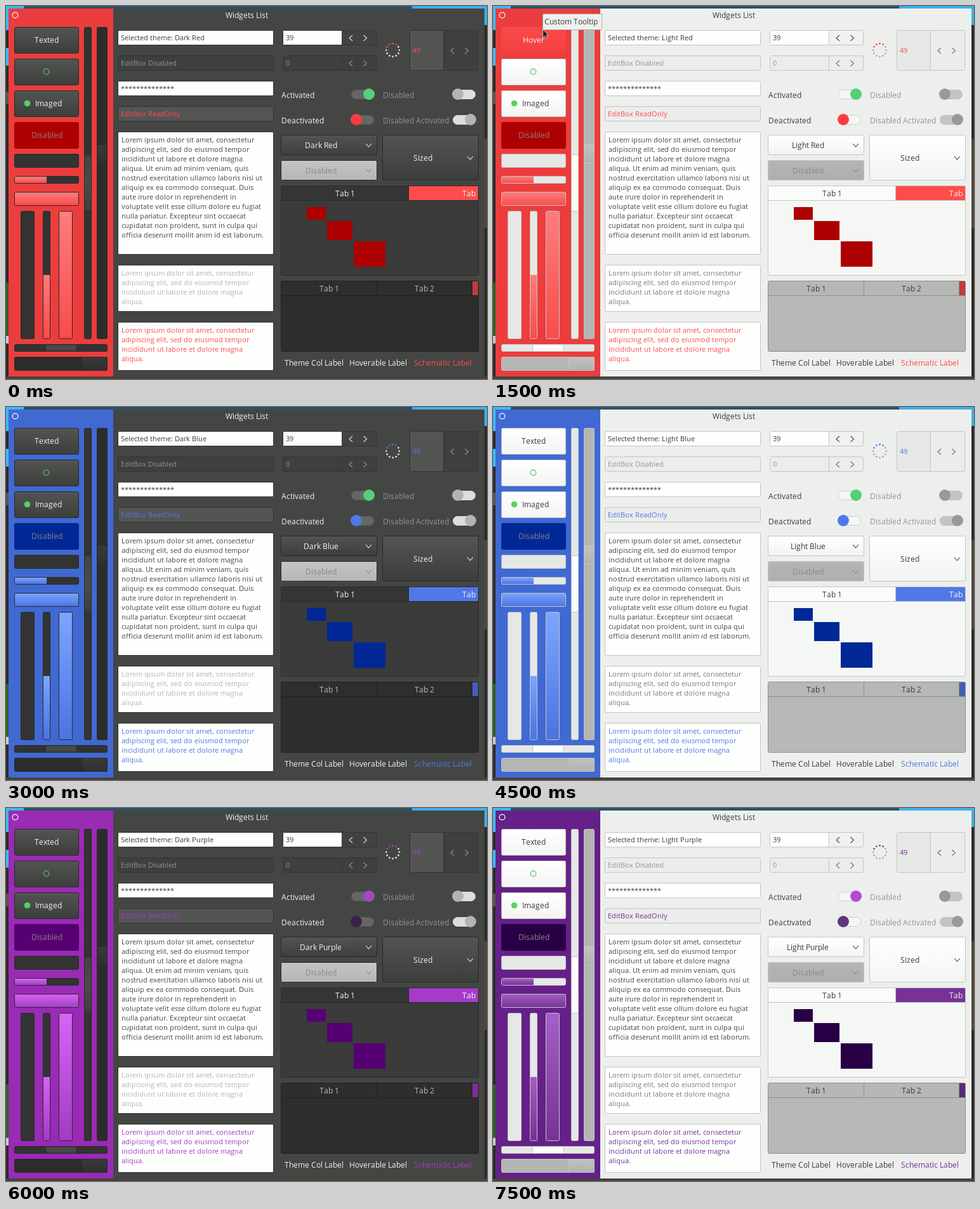
An HTML page with a canvas for the animation above (9000 ms loop, 758 px wide and 588 px high).

```html
<!DOCTYPE html>
<html lang="en">
<head>
<meta charset="utf-8">
<title>Widgets List</title>
<style>
html, body { margin: 0; width: 100%; height: 100%; overflow: hidden; }
canvas { display: block; width: 758px; height: 588px; }
</style>
</head>
<body>
<canvas id="stage" width="758" height="588"></canvas>
<script>
const ctx = document.getElementById('stage').getContext('2d');
const STEP = 1500;

const dark = {
  win: '#444644', text: '#f0f0f0', muted: '#929492', line: '#292a29',
  button: ['#535553', '#3c3e3c'], edit: '#fdfffd', editLine: '#333433', editOff: '#3e403e',
  readOnly: '#535553', hint: '#b4b4b4', arrows: '#414341', arrowsOff: '#3e403e',
  bigValue: '#535553', arrow: '#e0e0e0', arrowOff: '#929492',
  track: '#323332', thumb: ['#414341', '#4a4c4a', '#3c3e3c'], trackOff: '#2b2c2b', thumbOff: ['#393a39', '#2e2f2e'],
  switchOn: '#656765', switchOnLine: '#5c5e5c', switchOff: '#dcdedc', switchOffLine: '#dcdedc', knobOff: '#b2b4b2',
  comboOff: ['#c4c6c4', '#b4b6b4'], tabHead: '#343634', tabBody: '#3a3b3a',
  tabOff: '#2d2e2d', bodyOff: '#2c2d2c', tabOffLine: '#1f201f', tabOffText: '#b8bab8', dots: '#e8e8e8'
};
const light = {
  win: '#edefed', text: '#3c3e3c', muted: '#939593', line: '#c3c5c3',
  button: ['#ffffff', '#f2f4f2'], edit: '#fdfffd', editLine: '#c3c5c3', editOff: '#ebedeb',
  readOnly: '#ebedeb', hint: '#7a7c7a', arrows: '#f0f2f0', arrowsOff: '#ebedeb',
  bigValue: '#e6e8e6', arrow: '#464846', arrowOff: '#6e706e',
  track: '#e6e8e6', thumb: ['#fdfffd', '#f8faf8'], trackOff: '#b4b6b4', thumbOff: ['#c1c3c1', '#b0b2b0'],
  switchOn: '#f5f7f5', switchOnLine: '#cdcfcd', switchOff: '#c3c5c3', switchOffLine: '#b9bbb9', knobOff: '#989a98',
  comboOff: ['#b4b6b4', '#adafad'], tabHead: '#fafcfa', tabBody: '#f5f7f5',
  tabOff: '#b6b8b6', bodyOff: '#b7b9b7', tabOffLine: '#8c8e8c', tabOffText: '#3c3e3c', dots: '#a8aaa8'
};

const red = { side: '#eb3d3d', accent: '#ff4c4c', deep: '#ad0000', bar: ['#ff7d7d', '#fa4b4b'],
  dim: '#be3c3c', on: '#55cf78', off: '#ff3c3c' };
const blue = { side: '#4169d2', accent: '#5078e6', deep: '#002896', bar: ['#7da5ff', '#4b73e1'],
  dim: '#4160b4', on: '#55cf78', off: '#5078e6' };
const purple = { side: '#992bb4', accent: '#a53cc8', deep: '#570073', bar: ['#d764f5', '#a03cc3'],
  dim: '#7d2d96', on: '#a04bb9', off: '#3c2346' };
const violet = { side: '#652187', accent: '#783296', deep: '#280046', bar: ['#a55fc8', '#763295'],
  dim: '#5a2873', on: '#b04bd2', off: '#5f3780' };

const themes = [
  { name: 'Dark Red', ...dark, ...red },
  { name: 'Light Red', ...light, ...red, hover: true },
  { name: 'Dark Blue', ...dark, ...blue },
  { name: 'Light Blue', ...light, ...blue },
  { name: 'Dark Purple', ...dark, ...purple },
  { name: 'Light Purple', ...light, ...violet }
];

const lorem = [
  'Lorem ipsum dolor sit amet, consectetur', 'adipiscing elit, sed do eiusmod tempor',
  'incididunt ut labore et dolore magna', 'aliqua. Ut enim ad minim veniam, quis',
  'nostrud exercitation ullamco laboris nisi ut', 'aliquip ex ea commodo consequat. Duis',
  'aute irure dolor in reprehenderit in', 'voluptate velit esse cillum dolore eu fugiat',
  'nulla pariatur. Excepteur sint occaecat', 'cupidatat non proident, sunt in culpa qui',
  'officia deserunt mollit anim id est laborum.'
];
const shortLorem = [...lorem.slice(0, 3), 'aliqua.'];

function paint(color, y, h) {
  if (typeof color === 'string') return color;
  const g = ctx.createLinearGradient(0, y, 0, y + h);
  color.forEach((c, i) => g.addColorStop(i / (color.length - 1), c));
  return g;
}

function rect(x, y, w, h, color) {
  ctx.fillStyle = paint(color, y, h);
  ctx.fillRect(x, y, w, h);
}

function box(x, y, w, h, color, line, radius = 2) {
  ctx.beginPath();
  ctx.roundRect(x + 0.5, y + 0.5, w - 1, h - 1, radius);
  ctx.fillStyle = paint(color, y, h);
  ctx.fill();
  ctx.strokeStyle = line;
  ctx.lineWidth = 1;
  ctx.stroke();
}

// Glyphs advance by whole pixels, without kerning.
const advance = ch => Math.round(ctx.measureText(ch).width);

function text(str, x, y, color, size = 12, center = false) {
  ctx.font = `${size}px "Open Sans", "Noto Sans", sans-serif`;
  ctx.fillStyle = color;
  const chars = [...str];
  if (center) x = Math.floor(x - chars.reduce((sum, ch) => sum + advance(ch), 0) / 2);
  for (const ch of chars) {
    ctx.fillText(ch, x, y);
    x += advance(ch);
  }
}
const centered = (str, x, y, color) => text(str, x, y, color, 12, true);

function dot(x, y, r, color) {
  ctx.beginPath();
  ctx.arc(x, y, r, 0, Math.PI * 2);
  ctx.fillStyle = color;
  ctx.fill();
}

function ring(x, y, r, color) {
  ctx.beginPath();
  ctx.arc(x, y, r, 0, Math.PI * 2);
  ctx.strokeStyle = color;
  ctx.lineWidth = 1.2;
  ctx.stroke();
}

function stroke(points, color) {
  ctx.beginPath();
  points.forEach(([x, y]) => ctx.lineTo(x, y));
  ctx.strokeStyle = color;
  ctx.lineWidth = 1.1;
  ctx.stroke();
}
const sideArrow = (x, y, dir, color) =>
  stroke([[x - 2.5 * dir, y - 4.5], [x + 2.5 * dir, y], [x - 2.5 * dir, y + 4.5]], color);
const downArrow = (x, y, color) =>
  stroke([[x - 4.5, y - 2.5], [x, y + 2.5], [x + 4.5, y - 2.5]], color);

function backdrop() {
  rect(0, 0, 758, 588, '#2e2a27');
  rect(0, 0, 758, 4, '#2a5268');
  rect(0, 0, 28, 4, '#3cb9f5');
  rect(640, 0, 118, 4, '#3cb0ea');
  rect(0, 0, 4, 38, '#3cb9f5');
  rect(0, 66, 4, 28, '#3cb9f5');
  rect(0, 135, 4, 20, '#5c544c');
  rect(0, 436, 4, 84, '#2c641f');
  rect(0, 520, 4, 12, '#c8c8c8');
  rect(754, 0, 4, 30, '#3cb0ea');
  rect(754, 210, 4, 140, '#54473a');
  rect(0, 584, 758, 4, '#47413c');
}

function sidebar(t) {
  rect(4, 4, 165, 580, t.side);
  ring(14.5, 14.5, 4.4, '#fff');

  if (t.hover) {
    rect(13, 33, 102, 42, ['#fb4848', '#f23f3f']);
    centered('Hover', 64, 58, '#f5f5f5');
  } else {
    box(13, 33, 102, 42, t.button, t.line);
    centered('Texted', 64, 58, t.text);
  }
  box(13, 83, 102, 42, t.button, t.line);
  ring(63.5, 103.5, 4.3, '#4fc46a');
  box(13, 133, 102, 42, t.button, t.line);
  dot(33.5, 153.5, 4.8, '#5ad25a');
  text('Imaged', 46, 158, t.text);
  box(13, 183, 102, 42, t.deep, t.deep);
  centered('Disabled', 64.5, 208, '#8c8080');

  box(13, 233, 102, 22, t.track, t.line);
  box(13, 268, 102, 12, t.track, t.line);
  rect(14, 269, 50, 10, t.bar);
  box(13, 293, 102, 22, t.bar, t.line);
  box(23, 323, 22, 202, t.track, t.line);
  box(58, 323, 12, 202, t.track, t.line);
  rect(59, 424, 10, 100, t.bar);
  box(83, 323, 22, 202, t.bar, t.line);

  box(123, 33, 12, 492, t.track, t.line);
  box(123, 234, 12, 90, t.thumb, t.line, 0);
  box(143, 33, 17, 492, t.trackOff, t.line);
  box(143, 218, 17, 30, t.thumbOff, t.line, 0);
  box(13, 533, 147, 12, t.track, t.line);
  box(62, 533, 50, 12, t.thumb, t.line, 0);
  box(13, 553, 147, 22, t.trackOff, t.line);
  box(119, 553, 41, 22, t.thumbOff, t.line, 1);
}

function edits(t) {
  const field = (y, str, fill, color) => {
    box(176, y, 246, 24, fill, t.editLine);
    text(str, 181, y + 16, color, 11);
  };
  const memo = (y, h, lines, color) => {
    box(176, y, 246, h, t.edit, t.editLine);
    lines.forEach((s, i) => text(s, 182, y + 17 + i * 15, color, 11));
  };
  field(38, 'Selected theme: ' + t.name, t.edit, '#3c3e3c');
  field(78, 'EditBox Disabled', t.editOff, t.muted);
  field(118, '**************', t.edit, '#3c3e3c');
  field(158, 'EditBox ReadOnly', t.readOnly, t.accent);
  memo(198, 194, lorem, '#464846');
  memo(408, 74, shortLorem, t.hint);
  memo(498, 77, shortLorem, t.accent);
}

function spinner(t, x, y, w, h, split, str, value, arrows, color, arrow) {
  box(x, y, w, h, arrows, t.editLine);
  rect(x + 1, y + 1, split - x - 1, h - 2, value);
  rect(split, y, 1, h, t.editLine);
  const mid = y + h / 2;
  text(str, x + 5, mid + 4, color, 11);
  sideArrow(split + 14.5, mid + 0.5, -1, arrow);
  sideArrow(split + 37, mid + 0.5, 1, arrow);
}

function loader(t) {
  for (let i = 0; i < 12; i++) {
    const a = (i / 12) * Math.PI * 2 - Math.PI / 2;
    const top = i < 2 || i > 9;
    dot(609.5 + 10.3 * Math.cos(a), 69.5 + 10.3 * Math.sin(a), 1.35, top ? t.accent : t.dots);
  }
}

function toggle(x, y, on, fill, line, knob) {
  box(x - 18, y - 7, 36, 15, fill, line, 7);
  dot(x + (on ? 10 : -10), y, 9, knob);
}

function combo(t, x, y, h, str, textX, fill, color) {
  box(x, y, 152, h, fill, t.line);
  centered(str, textX, y + h / 2 + 5, color);
  downArrow(x + 138.5, y + h / 2 + 0.5, color);
}

function tabs(t) {
  box(433, 283, 312, 142, t.tabBody, t.line);
  rect(434, 284, 310, 22, t.tabHead);
  rect(433, 306, 312, 1, t.line);
  rect(634, 283, 1, 24, t.line);
  rect(635, 284, 109, 22, t.accent);
  centered('Tab 1', 534.5, 300, t.text);
  ctx.save();
  ctx.beginPath();
  ctx.rect(635, 284, 108, 22);
  ctx.clip();
  text('Tab 2', 719, 300, '#f5f5f5');
  ctx.restore();
  rect(474, 317, 30, 20, t.deep);
  rect(506, 339, 40, 30, t.deep);
  rect(548, 371, 50, 40, t.deep);

  box(433, 433, 312, 112, t.bodyOff, t.tabOffLine);
  rect(434, 434, 310, 22, t.tabOff);
  rect(433, 456, 312, 1, t.tabOffLine);
  rect(584, 433, 1, 24, t.tabOffLine);
  rect(734, 433, 1, 24, t.tabOffLine);
  rect(735, 434, 9, 22, t.dim);
  centered('Tab 1', 509.5, 450, t.tabOffText);
  centered('Tab 2', 659.5, 450, t.tabOffText);
}

function tooltip() {
  box(78, 12, 94, 26, '#eff1ef', '#a5a7a5', 1);
  text('Custom Tooltip', 81, 29, '#3c3e3c');
  ctx.beginPath();
  [[78.5, 37], [78.5, 50], [81.5, 47.5], [84, 52], [86, 51], [83.8, 46.5], [87.5, 46]]
    .forEach(([x, y]) => ctx.lineTo(x, y));
  ctx.closePath();
  ctx.fillStyle = '#222';
  ctx.fill();
  ctx.strokeStyle = '#e8e8e8';
  ctx.lineWidth = 0.8;
  ctx.stroke();
}

function draw(t) {
  backdrop();
  rect(4, 4, 750, 580, t.win);
  sidebar(t);
  centered('Widgets List', 379.5, 19, t.text);
  edits(t);

  spinner(t, 436, 38, 148, 24, 529, '39', t.edit, t.arrows, '#3c3e3c', t.arrow);
  spinner(t, 436, 78, 148, 24, 529, '0', t.editOff, t.arrowsOff, t.muted, t.arrowOff);
  spinner(t, 636, 38, 108, 64, 689, '49', t.bigValue, t.arrowsOff, t.accent, t.arrowOff);
  loader(t);

  text('Activated', 434, 145, t.text);
  text('Disabled', 594, 145, t.muted);
  text('Deactivated', 434, 185, t.text);
  text('Disabled Activated', 594, 185, t.muted);
  toggle(562, 139, true, t.switchOn, t.switchOnLine, t.on);
  toggle(722, 139, false, t.switchOff, t.switchOffLine, t.knobOff);
  toggle(562, 179, false, t.switchOn, t.switchOnLine, t.off);
  toggle(722, 179, true, t.switchOff, t.switchOffLine, t.knobOff);

  combo(t, 433, 203, 32, t.name, 496.5, t.button, t.text);
  combo(t, 433, 243, 32, 'Disabled', 496.5, t.comboOff, '#868886');
  combo(t, 593, 203, 72, 'Sized', 657, t.button, t.text);
  tabs(t);

  text('Theme Col Label', 439, 567, t.text);
  text('Hoverable Label', 541, 567, t.text);
  text('Schematic Label', 643, 567, t.accent);
  if (t.hover) tooltip();
}

let shown = -1;
function tick() {
  const index = Math.floor(performance.now() / STEP) % themes.length;
  if (index !== shown) draw(themes[shown = index]);
  requestAnimationFrame(tick);
}
tick();
</script>
</body>
</html>
```
